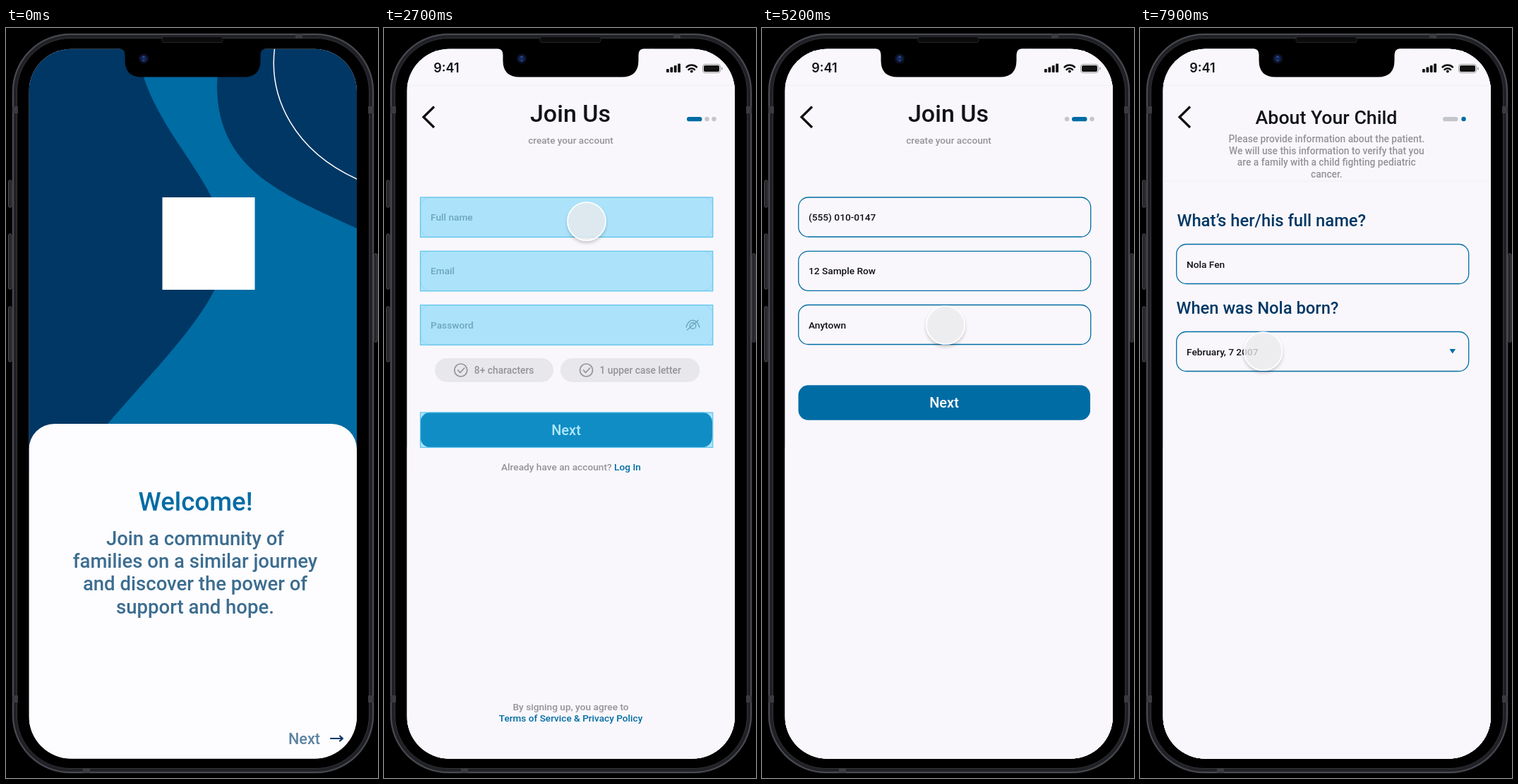
These frames come from a looping animation (527 by 1063 pixels, 8000 ms). An HTML page:

```html
<!DOCTYPE html>
<html lang="en">
<head>
<meta charset="utf-8">
<title>Sign-up flow</title>
<style>
  html, body { margin: 0; height: 100%; overflow: hidden; background: #000; }
  svg { display: block; width: 100vw; height: 100vh; font: 500 13.7px Roboto, sans-serif; }
  .mid { text-anchor: middle; }
  .ink { fill: #121317; }
  .blue { fill: #006ca4; }
  .navy { fill: #003764; }
  .grey { fill: #949398; }
  .line { fill: none; stroke-linecap: round; stroke-linejoin: round; }
</style>
</head>
<body>
<svg id="stage" viewBox="0 0 527 1063">
  <defs>
    <clipPath id="screen"><rect x="32.5" y="29.7" width="464.5" height="1005.8" rx="60"/></clipPath>
    <filter id="shadow" x="-30%" y="-30%" width="160%" height="170%">
      <feDropShadow dx="0" dy="3" stdDeviation="2" flood-opacity=".22"/>
    </filter>
  </defs>
  <g id="phone"></g>
  <g id="pages" clip-path="url(#screen)"></g>
  <g id="notch"></g>
  <g id="cursor">
    <circle r="27" fill="#f0f0f2" fill-opacity=".74" stroke="#fff" stroke-width="1.6" filter="url(#shadow)"/>
  </g>
</svg>
<script>
const LOOP = 8000, STEP = 100, SLIDE = 300, WIDTH = 464.5;
const BLUE = '#006ca4', PALE = '#e8e7eb', GREY = '#949398', DOT = '#c5c5ca';
const $ = id => document.getElementById(id);

const rect = (x, y, w, h, r, fill, extra = '') =>
  `<rect x="${x}" y="${y}" width="${w}" height="${h}" rx="${r}" fill="${fill}" ${extra}/>`;
const circle = (x, y, r, fill) => `<circle cx="${x}" cy="${y}" r="${r}" fill="${fill}"/>`;
const line = (d, stroke, width) =>
  `<path class="line" d="${d}" stroke="${stroke}" stroke-width="${width}"/>`;
// [brackets] mark blue words
const text = (x, y, size, cls, str) =>
  `<text x="${x}" y="${y}" font-size="${size}" class="${cls}">${
    str.replace(/\[(.*?)\]/g, '<tspan class="blue">$1</tspan>')}</text>`;
const lines = (x, y, step, size, cls, rows) =>
  rows.map((row, i) => text(x, y + i * step, size, cls, row)).join('');
const during = (from, to, content) => `<g data-from="${from}" data-to="${to}">${content}</g>`;
const page = (start, content) =>
  `<g data-slide="${start}">${rect(32.5, 29, WIDTH, 1007, 0, '#f9f7fb')}${content}</g>`;

const button = (x, y, label, size) =>
  rect(x, y, 413.5, 49.5, 14, BLUE) +
  `<text x="${x + 206.5}" y="${y + 32}" font-size="${size}" class="mid" fill="#fff">${label}</text>`;

function field(y, hint, value, at, size = 13.7) {
  const box = stroke => rect(51.7, y, 414, 56, 14, 'none', `stroke="${stroke}" stroke-width="1.3"`);
  return during(0, at, box(PALE) + text(66, y + 33, 13.7, 'grey', hint)) +
    during(at, LOOP, box(BLUE) + text(66, y + (size > 14 ? 37 : 33), size, 'ink', value));
}

function rule(x, w, label, at) {
  const look = (color, cls, border) =>
    rect(x, 468.7, w, 32.3, 16, PALE, `stroke="${border}" stroke-width="1.3"`) +
    `<circle cx="${x + 36}" cy="485" r="9" fill="none" stroke="${color}" stroke-width="1.7"/>` +
    line(`M${x + 32} 485l3 3.5 6-6.5`, color, 1.7) + text(x + 55, 490, 13.8, cls, label);
  return during(0, at, look(GREY, 'grey', PALE)) + during(at, LOOP, look(BLUE, 'blue', BLUE));
}

function header(progress) {
  const bars = [5, 7.5, 10, 12.5].map((h, i) => rect(400 + i * 5.4, 63 - h, 3.8, h, 1, '#111')).join('');
  return `<text x="70.3" y="63" class="ink" style="font:600 18px Inter,sans-serif">9:41</text>` + bars +
    line('M428.5 55.5a10.5 10.5 0 0 1 14.5 0M431.5 59a6 6 0 0 1 8.5 0', '#111', 2.5) +
    circle(435.8, 61.5, 1.9, '#111') +
    rect(451.5, 51.5, 25, 12, 3.5, 'none', 'stroke="#999" stroke-width="1"') +
    rect(453, 53, 22, 9, 2, '#111') + rect(478, 55.5, 1.5, 4, 1, '#999') +
    rect(32.5, 81, WIDTH, 1, 0, '#f0eff2') +
    `<path d="M71 111.5L56 126.2 71 141" fill="none" stroke="#111" stroke-width="3.3"/>` + progress;
}
const dot = (x, color) => circle(x, 129, 3.2, color);
const pill = (x, color) => rect(x, 126, 21.5, 6.3, 3.1, color);
const account = y => text(166, y, 13.7, 'grey', 'Already have an account? [Log In]');
const joinTitle = text(264, 133, 34, 'mid ink', 'Join Us') +
  text(264.5, 164, 13.6, 'mid grey', 'create your account');

const welcome =
  rect(32.5, 29, WIDTH, 600, 0, '#003764') +
  `<path class="blue" d="M187 30C197 140 312 219 311 313C309 385 240 450 144 561V600H497V284
    C396 237 302 203 299 87C299 60 303 45 308 30Z"/>` +
  line('M380.500 29C372 100 409 174 497 214', '#fff', 1.5) +
  rect(221.5, 240, 131, 131, 0, '#fff') +
  rect(32.5, 561, WIDTH, 520, 36, '#fdfcfe') +
  text(268.5, 684, 36.6, 'mid blue', 'Welcome!') +
  `<g fill="#3c6d90">` + lines(268, 732.8, 32.3, 27.5, 'mid', [
    'Join a community of', 'families on a similar journey',
    'and discover the power of', 'support and hope.']) + '</g>' +
  `<g fill="#5c84a1">${text(400, 1015, 21.6, '', 'Next')}</g>` +
  line('M460 1007h17m-4-3.5l4 3.5-4 3.5', '#003764', 2.2);

const mission =
  rect(194, 110, 128, 128, 0, '#29595d') +
  lines(76.5, 316, 23.85, 20.4, 'ink', [
    'Our mission is to build hope for families', '[who are fighting pediatric cancer] just',
    'like yours. Welcome to the 2846', 'community – a community you never',
    'wanted to be a part of, [but one that will]', '[stick with you through the ups and]',
    '[downs of this unimaginable battle.]']) +
  lines(76.5, 509, 23.85, 20.4, 'ink', [
    "Your privacy matters to us, and that's", 'why we kindly request you to complete',
    '[a vetting form] during registration. Our', 'team will verify that you are a family',
    'with a child fighting pediatric cancer.']) +
  lines(76.5, 652, 23.85, 20.4, 'ink', [
    'Our commitment to safeguarding all our', "users' personal information ensures",
    'that you can share your journey with our', 'community with peace of mind. [Your]',
    '[safety and security are our top priorities.]']) +
  button(57.3, 880.7, 'Join', 19.4) + account(979);

const hotspots = [[240, 56.5], [316.3, 56.5], [392.7, 56.5], [545, 49.5]].map(([y, h]) =>
  rect(51.5, y, 414.3, h, 0, '#2fc3fa', 'fill-opacity=".38" stroke="#5cc4ee" stroke-width="1.2"')).join('');

const signUp =
  header(pill(429, BLUE) + dot(457.5, DOT) + dot(467.5, DOT)) + joinTitle +
  field(240, 'Full name', 'Marla Tolvern', 3600) +
  field(316.3, 'Email', 'marla_tolvern@post.test', 3900) +
  field(392.5, 'Password', '**********', 4100, 19) +
  line('M428 424c4-13 15-13 19 0M445.5 414l-16 14', GREY, 1.4) +
  `<circle cx="437.5" cy="422" r="4.3" fill="none" stroke="${GREY}" stroke-width="1.4"/>` +
  rule(72.8, 166.5, '8+ characters', 4100) + rule(250.6, 196, '1 upper case letter', 4100) +
  button(51.5, 544.8, 'Next', 20) + account(627) +
  text(264.5, 966.5, 13.7, 'mid grey', 'By signing up, you agree to') +
  text(264.5, 983, 13.6, 'mid blue', 'Terms of Service &amp; Privacy Policy') +
  `<g id="hotspots">${hotspots}</g>`;

const contact =
  header(dot(432, DOT) + pill(439, BLUE) + dot(467.5, DOT)) + joinTitle +
  field(240, 'Phone number', '(555) 010-0147', 4900) +
  field(316.3, 'Address line', '12 Sample Row', 5100) +
  field(392.5, 'City', 'Anytown', 5200) +
  button(51.5, 506.3, 'Next', 20);

const arrow = fill => `<path d="M438.5 455h8.5l-4.25 6.5z" fill="${fill}"/>`;
const child =
  header(pill(429, '#c4c6cb') + dot(458.5, BLUE)) +
  text(264, 136, 26.7, 'mid ink', 'About Your Child') +
  lines(264.3, 161.8, 16.7, 13.75, 'mid grey', [
    'Please provide information about the patient.', 'We will use this information to verify that you',
    'are a family with a child fighting pediatric', 'cancer.']) +
  rect(32.5, 216.5, WIDTH, 1, 0, '#f0eff2') +
  text(52.5, 281, 23.75, 'navy', 'What’s her/his full name?') +
  field(306.5, 'Full name', 'Nola Fen', 6500) +
  during(6500, LOOP, text(51.5, 405, 23.75, 'navy', 'When was Nola born?') +
    field(430.5, 'Date of birth', 'February, 7 2007', 7300) +
    during(0, 7300, arrow(GREY)) + during(7300, LOOP, arrow(BLUE)));

$('pages').innerHTML = page(-SLIDE, welcome) + page(550, mission) + page(1350, signUp) +
  page(4447, contact) + page(5350, child);

const shell = (inset, stroke, width) => rect(9 + inset, 8 + inset, 512 - 2 * inset, 1048 - 2 * inset,
  82 - inset, 'none', `stroke="${stroke}" stroke-width="${width}"`);
const sideKey = (x, y, h) => rect(x, y, 4.5, h, 1.5, '#242529', 'stroke="#505156" stroke-width="1"');
$('phone').innerHTML = rect(0, 0, 527, 1063, 0, '#000') +
  sideKey(3.5, 216, 38) + sideKey(3.5, 292, 78) + sideKey(3.5, 395, 78) + sideKey(521.5, 320, 125) +
  shell(3, '#202126', 7) + shell(1, '#494a50', 2) + shell(6.5, '#34353a', 1) +
  [[9, 111, 8, 10], [9, 946, 8, 10], [513, 111, 8, 10], [513, 946, 8, 10], [410, 8, 10, 7], [109, 1049, 10, 7]]
    .map(([x, y, w, h]) => rect(x, y, w, h, 0, '#3a3b40')).join('') +
  rect(221, 12.5, 86, 8, 3, '#0b0b0c', 'stroke="#25262a" stroke-width="1"');
$('notch').innerHTML =
  '<path d="M161 29Q168.500 30 168.500 38V46Q168.500 69.500 192 69.500H337Q360.500 69.500 360.500 46V38Q360.500 30 368 29Z"/>' +
  circle(195, 43.5, 7, '#0c1022') + circle(195, 43.5, 4.5, '#142454') +
  circle(195, 41, 1.6, '#2c4a94') + circle(195, 46, 1.4, '#26407f');

// Cursor stops: time, x, y
const stops = [
  [200, 470, 940], [400, 438, 1005], [650, 438, 1005], [1200, 375, 917], [1700, 375, 917],
  [2500, 287, 274], [2800, 287, 274], [3200, 287, 187], [3500, 262, 268], [3600, 262, 268],
  [3850, 258, 345], [4050, 256, 421], [4350, 259, 558], [4600, 259, 558], [4850, 262, 268],
  [5050, 260, 345], [5200, 260, 421], [5350, 260, 531], [5450, 260, 531], [5800, 275, 372],
  [6200, 240, 345], [6550, 240, 340], [6950, 190, 472], [7300, 174.5, 458], [8000, 174.5, 458]];

const clamp = v => Math.max(0, Math.min(1, v));
const easeOut = p => 1 - (1 - p) ** 2;
const smooth = p => p * p * (3 - 2 * p);

function cursorAt(t) {
  const i = Math.max(1, stops.findIndex(s => s[0] > t));
  const [t0, x0, y0] = stops[i - 1], [t1, x1, y1] = stops[i];
  const p = smooth(clamp((t - t0) / (t1 - t0)));
  return `translate(${x0 + (x1 - x0) * p} ${y0 + (y1 - y0) * p})`;
}

const timed = [...document.querySelectorAll('[data-from]')];
const slides = [...document.querySelectorAll('[data-slide]')];

function frame() {
  const t = Math.floor(performance.now() % LOOP / STEP) * STEP;
  for (const el of timed)
    el.style.display = t >= +el.dataset.from && t < +el.dataset.to ? '' : 'none';
  for (const el of slides) {
    const p = clamp((t - el.dataset.slide) / SLIDE);
    el.style.display = p ? '' : 'none';
    el.setAttribute('transform', `translate(${WIDTH * (1 - easeOut(p))} 0)`);
  }
  $('hotspots').style.opacity = t < 2600 ? 0 : 1 - clamp((t - 2750) / 250);
  $('cursor').style.display = t < 200 ? 'none' : '';
  $('cursor').setAttribute('transform', cursorAt(t));
  requestAnimationFrame(frame);
}
frame();
</script>
</body>
</html>
```
